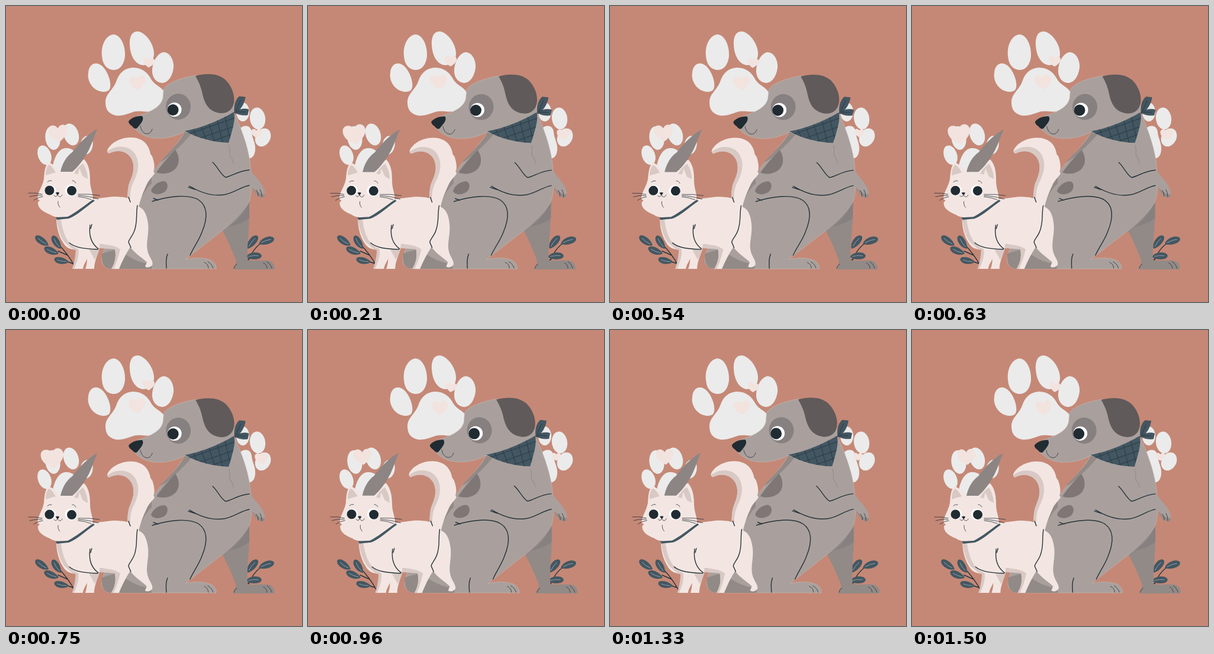
Animation of 500x500 px, one loop 1540 ms. Source, as an HTML page:

```html
<!DOCTYPE html>
<html lang="en">
<head>
<meta charset="utf-8">
<title>Cat and dog</title>
<style>
html, body { margin: 0; height: 100%; overflow: hidden; background: #c58876 }
svg { display: block; width: 100vw; height: 100vh }
.white { fill: #ebebeb }
.heart { fill: #f2e3df }
.dog { fill: #a9a09d }
.dogshade { fill: #928a87 }
.spot { fill: #7e7775 }
.cat { fill: #f3e6e2 }
.catshade { fill: #d8c9c5 }
.cloth { fill: #435762 }
.ink { fill: #202b32 }
.rim { stroke: #cbc1bc; stroke-width: .5 }
.line { fill: none; stroke: #26333a; stroke-width: 1.4; stroke-linecap: round; stroke-linejoin: round }
.thin { stroke-width: .8 }
</style>
</head>
<body>
<svg viewBox="0 0 500 500">
<defs>
  <path id="heart" d="M0 9C-6 6-11 1-10-5C-9-10-2-10 0-5C3-10 9-9 10-4C11 1 5 6 0 9Z"/>
  <g id="leaf">
    <path class="cloth" d="M0 0C4-6 14-7 20-5C27-2 26 3 20 4.500C13 6 5 4 0 0Z"/>
    <path d="M4-.5Q12-2 20-.3" fill="none" stroke="#a9b0b3" stroke-width=".7"/>
  </g>
  <clipPath id="scarf"><path d="M302 211C328 207 362 193 385 179C388 190 384 205 376 231C350 230 322 223 302 211Z"/></clipPath>
</defs>

<g class="white">
  <path d="M139 113C140 97 153 92 164 103C174 114 180 135 174 142C166 149 149 143 143 132C139 125 138 119 139 113Z"/>
  <path d="M162 84C160 62 172 48 182 48C194 49 202 67 201 85C199 102 190 109 180 108C169 106 163 98 162 84Z"/>
  <path d="M209 66C208 52 213 42 223 43C237 45 251 66 250 82C249 95 241 100 231 100C217 98 210 83 209 66Z"/>
  <path d="M247 112C246 98 254 80 266 78C277 78 284 92 283 104C281 120 273 130 263 130C254 129 248 122 247 112Z"/>
  <path d="M168 163C168 148 180 143 186 128C191 112 201 105 214 104C230 104 240 113 246 125C252 134 262 136 268 146C272 160 265 175 250 178C237 180 226 176 215 179C203 183 195 186 186 185C175 183 168 176 168 163Z"/>
  <ellipse cx="65" cy="252" rx="11" ry="17" transform="rotate(-20 65 252)"/>
  <ellipse cx="79" cy="223" rx="12.500" ry="20" transform="rotate(-8 79 223)"/>
  <ellipse cx="110" cy="217" rx="12.500" ry="19" transform="rotate(-18 110 217)"/>
  <ellipse cx="136" cy="235" rx="10.500" ry="16" transform="rotate(10 136 235)"/>
  <path d="M78 275C80 262 86 240 102 240C118 240 125 258 128 266L120 286H80Z"/>
  <ellipse cx="400" cy="179" rx="11" ry="16"/>
  <ellipse cx="425" cy="190" rx="13" ry="18.500" transform="rotate(-8 425 190)"/>
  <ellipse cx="434" cy="222" rx="12.500" ry="16" transform="rotate(28 434 222)"/>
  <path d="M396 206C405 199 414 203 415 213C416 225 422 231 421 243C420 255 414 259 406 257Z"/>
</g>
<g class="heart" id="hearts"></g>

<path class="line" d="M115 438Q104 418 88 402M113 435Q100 431 92 428M104 421L88 414M407 436Q416 410 432 400M407 430Q414 424 422 422"/>
<use href="#leaf" transform="translate(72 404) rotate(214) scale(1.08)"/>
<use href="#leaf" transform="translate(89 418) rotate(201) scale(1.05)"/>
<use href="#leaf" transform="translate(106 432) rotate(190)"/>
<use href="#leaf" transform="translate(93 410) rotate(236) scale(1.05)"/>
<use href="#leaf" transform="translate(408 410) rotate(-53) scale(1.1)"/>
<use href="#leaf" transform="translate(427 402) rotate(-20) scale(1.1)"/>
<use href="#leaf" transform="translate(405 424) rotate(-5) scale(1.08)"/>

<g id="pets">
  <!-- dog -->
  <path class="dogshade" d="M364 376L411 326L411 358C410 385 407 405 408 429C418 431 430 429 443 430C452 432 455 440 453 445H384C384 440 390 436 388 429C383 415 374 395 364 376Z"/>
  <path fill="#878080" d="M376 373C392 362 402 350 411 330V358C402 366 390 369 376 373Z"/>
  <path class="dog rim" d="M302 212L385 180C397 205 408 235 412 262C416 295 416 318 410 332C398 352 374 373 366 379L303 428C320 424 344 425 351 433C354 437 356 441 355 444H180C167 444 160 436 162 425C165 400 205 350 222 322C231 308 243 289 254 273C264 258 294 230 302 212Z"/>
  <path class="dogshade" d="M302 212C296 229 272 249 260 264C268 260 276 254 284 246C294 237 304 227 312 217ZM162 418C161 438 167 444 180 444H246V436C228 434 210 428 190 410ZM246 287C236 300 229 311 222 322V338C230 320 238 306 246 300Z"/>
  <path class="spot" d="M286 243C294 254 294 269 284 277C276 283 264 285 254 281C266 264 272 258 286 243Z"/>
  <path class="spot" d="M245 312C248 302 260 295 268 296C275 299 274 309 268 314C261 319 249 320 245 312Z"/>
  <path class="dog" d="M408 276C413 275 416 282 421 288C428 295 436 306 437 314C438 321 434 325 430 323C424 321 419 314 416 307C412 302 407 303 402 303Z"/>
  <path class="dogshade" d="M416 306C422 313 429 318 437 318C437 323 433 325 430 323C424 321 419 314 416 306Z"/>
  <path class="line" d="M349 264C358 272 362 284 371 289.500C382 287 394 278 411 277M310 304C328 315 350 322 370 318.500C386 315 396 306 411 303M320 310L308 306"/>
  <path class="line thin" d="M423 311Q427 316 426 321M429 310Q433 316 432 322M335 433Q342 436 342 443M341 432Q348 436 350 443M435 434Q441 437 441 443M441 432Q447 436 449 443M385 443Q386 438 390 436"/>
  <path class="line" d="M247 330C275 321 310 317 326 328C344 341 338 365 331 382C325 398 317 407 311 421M257 328L249 325M273 419C269 428 271 436 271 443"/>
  <path d="M376 235C381 244 375 247 379 254C385 260 381 261 385 266" fill="none" stroke="#928a87"/>

  <path class="dog rim" d="M266 143C267 133 290 122 322 117L384 150L385 180L375 229L302 212C285 222 262 226 243 222C228 219 216 208 210 198L222 186C240 180 262 172 265 155Z"/>
  <ellipse cx="291" cy="170" rx="21" ry="22" fill="#878080"/>
  <circle cx="284.500" cy="175" r="12" fill="#fff"/>
  <circle class="ink" cx="282" cy="175.500" r="9.500"/>
  <path fill="#605a5a" d="M320 118C340 113 359 114 371 125C381 135 387 150 385 163C383 176 373 182 362 181C338 178 334 158 331 145C328 132 324 126 320 118Z"/>
  <path class="ink" d="M207 195C211 189 222 185 230 186C233 190 231 195 224 203C220 209 217 208 213 203C209 200 207 198 207 195Z"/>
  <path class="line thin" d="M227 203C229 217 243 221 247 208"/>
  <g clip-path="url(#scarf)">
    <path class="cloth" d="M295 170H400V240H295Z"/>
    <path d="M300 219L392 187M310 229L395 200M340 231L392 213M314 203L325 228M328 200L340 230M342 196L354 234M356 190L367 234M369 184L379 226" fill="none" stroke="#2c3f4a" stroke-width="1.200"/>
  </g>
  <path class="cloth" stroke="#2c3f4a" stroke-width=".6" d="M386 181C385 168 388 158 394 153L404 154C402 166 397 174 388 181ZM387 179C395 173 405 173 410 175L408 184C400 185 393 184 387 180Z"/>
  <path class="line thin" d="M388 178L396 159M390 179L404 179"/>

  <!-- cat -->
  <path class="cat" d="M206 334C205 322 205 311 208 300C213 288 219 275 213 260C206 245 190 241 174 249C170 247 169 243 178 234C194 220 222 217 236 232C241 238 243 244 244 250L247 254C252 268 251 277 249 279L251 283C246 290 240 295 237 303C231 316 226 329 223 345Z"/>
  <path class="catshade" d="M171 246C184 234 208 234 218 250C228 267 222 285 214 300C209 312 209 325 211 336L206 334C205 322 205 311 208 300C213 288 219 275 213 260C206 245 190 241 174 249Z"/>
  <path class="cat" d="M85 358C85 375 90 390 96 399C102 410 110 411 118 412C118 425 116 435 112 444H130C131 437 135 432 137 427C137 433 136 439 134 444H149C149 432 155 421 158 408L160 402C171 404 181 405 184 411C187 425 183 436 178 444H191C196 432 202 419 210 407C217 418 233 427 238 433L235 440Q240 444 247 438C250 431 241 424 239 413C236 400 242 385 240 368C238 350 232 341 222 338C215 323 198 322 180 322L147 326L120 345Z"/>
  <path class="catshade" d="M85 359C88 380 93 391 99 399L113 411L118 412C117 425 115 435 112 444H115C121 431 124 420 122 410C105 405 96 385 93 361ZM140 411L158 410C156 418 153 423 150 429C146 421 143 416 140 411ZM158 402C170 403 184 404 193 411C190 424 186 436 182 444H178C183 436 187 425 184 411L158 409Z"/>
  <path class="line" d="M142 370C140 385 142 400 156 410M107 400C116 408 130 410 155 411M222 337C219 353 223 366 216 382C212 391 207 395 207 399L211 408M207 323L210 331M143 376L145 369"/>

  <path class="cat" d="M64 292C65 279 66 269 72 264C80 267 87 274 92 280L111 281C116 270 123 263 132 259C140 268 142 280 142 294C142 308 147 315 147 327C137 345 116 357 92 357C82 357 77 354 74 352C64 348 53 342 54 331L57 329L53 325C55 311 61 307 64 292Z"/>
  <path class="catshade" d="M67 286C67 277 69 270 73 268C78 271 81 276 84 281ZM115 283C119 276 123 271 130 266C135 274 138 282 138 292C131 289 127 285 115 283Z"/>
  <path class="cat" d="M121 287L124 274L131 291Z"/>
  <path fill="#8c8584" d="M154 208C140 215 125 230 112 247C102 254 95 266 92 280H112C122 272 132 258 140 243C146 230 150 218 154 208Z"/>
  <path class="cloth" d="M84 357L104 356C118 349 131 338 147 327L150 329C134 340 120 354 106 359L86 361Z"/>
  <circle cx="75" cy="311" r="9" fill="#fff"/>
  <circle class="ink" cx="73.500" cy="311.500" r="8"/>
  <circle cx="109.500" cy="311.500" r="9.800" fill="#fff"/>
  <circle class="ink" cx="111" cy="312" r="8"/>
  <path class="ink" d="M84 315Q87 314 90 315Q89 319 87 319Q85 318 84 315Z"/>
  <path class="line thin" d="M87 318C87 322 83 323 81 320M87 318C88 323 93 324 95 319M88 330Q87 336 91 340M70 297Q73 294 77 295M112 295Q116 295 118 299M61 318Q50 315 38 316M61 320Q50 319 40 322M62 322Q54 323 47 328M122 318Q140 317 158 320M122 320Q140 321 156 326M122 322Q134 323 144 327"/>
</g>
</svg>
<script>
const LOOP = 1540;
const BEATS = [-60, 500, LOOP - 60];
// resting and swollen pose: x, y, width, tilt
const HEARTS = [
  [[93, 214, 30, -6], [79, 217, 38, -10]],
  [[242, 97, 18, 8], [241, 93, 20, 0]],
  [[223, 131, 27, -8], [221.5, 128, 28, -8]],
  [[419, 214, 15, 0], [432, 217, 22, -10]]
];
const pets = document.getElementById('pets');
const holder = document.getElementById('hearts');
holder.innerHTML = '<use href="#heart"/>'.repeat(HEARTS.length);

const smooth = u => {
  u = Math.min(1, Math.max(0, u));
  return u * u * (3 - 2 * u);
};
const pulse = t => smooth(t / 160) - smooth((t - 320) / 160);

function draw(now) {
  const t = now % LOOP;
  const sway = Math.sin(t / LOOP * 2 * Math.PI);
  const skew = -0.016 * sway, stretch = 1 - 0.003 * sway;
  pets.setAttribute('transform',
    `matrix(1 0 ${skew} ${stretch} ${-295 * skew} ${445 * (1 - stretch)})`);

  const beat = BEATS.reduce((sum, start) => sum + pulse(t - start), 0);
  HEARTS.forEach(([rest, full], i) => {
    const [x, y, w, tilt] = rest.map((v, j) => v + (full[j] - v) * beat);
    holder.children[i].setAttribute('transform',
      `translate(${x} ${y}) rotate(${tilt}) scale(${w / 20})`);
  });
  requestAnimationFrame(draw);
}
draw(performance.now());
</script>
</body>
</html>
```
